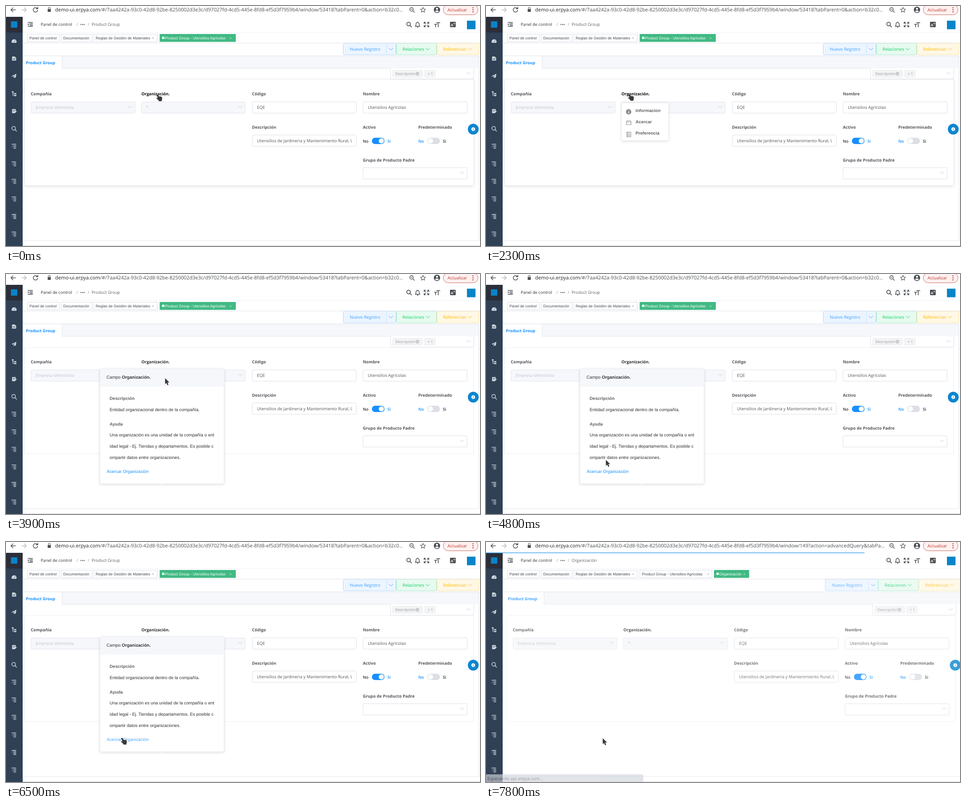
Animation, 1052 px wide and 532 px high, one loop 8 s. Source, as an HTML page:

```html
<!DOCTYPE html>
<html lang="es">
<head>
<meta charset="utf-8">
<title>Product Group</title>
<style>
html, body { margin: 0; width: 100%; height: 100%; overflow: hidden; background: #fff; }
svg { display: block; width: 1052px; height: 532px; }
text { font: 9.2px "Open Sans", "Noto Sans", sans-serif; fill: #303133; white-space: pre; text-rendering: geometricPrecision; }
.url { font-size: 11px; fill: #4c5055; }
.label { font-weight: 700; fill: #54575c; }
.value { font-size: 9.4px; fill: #505358; }
.button { font-size: 9.6px; }
.chip { font-size: 8.1px; fill: #909399; }
.state { font-size: 9px; font-weight: 600; }
.tab { font: 8.36px "Liberation Sans", Arial, sans-serif; fill: #414754; }
.body { font: 9.7px "Liberation Sans", Arial, sans-serif; }
.strong { font-weight: 700; fill: #606266; }
</style>
</head>
<body>
<svg id="stage" viewBox="0 0 1052 532" xmlns="http://www.w3.org/2000/svg"></svg>
<script>
const BLUE = '#1890ff', BRAND = '#0a84c8', GREEN = '#42b983';
const GROUP = 'Utensilios Agrícolas';

const text = (x, y, s, cls = '', more = '') => `<text x="${x}" y="${y}" class="${cls}" ${more}>${s}</text>`;
const rect = (x, y, w, h, fill, stroke = 'none', r = 0, more = '') =>
  `<rect x="${x}" y="${y}" width="${w}" height="${h}" rx="${r}" fill="${fill}" stroke="${stroke}" ${more}/>`;
const circle = (x, y, r, fill, stroke = 'none', more = '') =>
  `<circle cx="${x}" cy="${y}" r="${r}" fill="${fill}" stroke="${stroke}" ${more}/>`;
const line = (d, stroke, w = 1) =>
  `<path d="${d}" fill="none" stroke="${stroke}" stroke-width="${w}" stroke-linecap="round" stroke-linejoin="round"/>`;
const shape = (d, fill, more = '') => `<path d="${d}" fill="${fill}" ${more}/>`;
const at = (x, y, s) => `<g transform="translate(${x} ${y})">${s}</g>`;
const group = (id, s, more = '') => `<g id="${id}" ${more}>${s}</g>`;
const chevron = (x, y, color = '#c0c4cc') => line(`M${x - 4} ${y - 2}l4 4 4-4`, color);
const lens = (x, y, color, w) => circle(x - 1, y - 1, 4, 'none', color, `stroke-width="${w}"`) + line(`M${x + 2} ${y + 2}l3.5 3.5`, color, w);

function browserBar() {
  const ink = '#4a4d51';
  return rect(0, 0, 1052, 24, '#fff') +
    line('M21 8.5H11M15.5 4L11 8.5l4.5 4.5', ink, 1.5) +
    line('M35 8.5H45M40.5 4L45 8.5l-4.5 4.5', '#babcbe', 1.5) +
    line('M69.5 5.5a5 5 0 1 0 .8 4M70.5 2.5v3.7h-3.7', ink, 1.5) +
    rect(92.5, 7, 7, 6, ink, 'none', 1) + line('M94 7V5a2 2 0 0 1 4 0v2', ink, 1.2) +
    text(109, 12.3, '', 'url', 'id="url"') +
    lens(901, 8.5, ink, 1.3) + line('M898 7.5h4', ink) +
    line('M925.5 3l1.6 3.7 4 .4-3 2.7.9 4-3.5-2.1-3.5 2.1.9-4-3-2.7 4-.4z', ink, 1.1) +
    circle(956.5, 8.5, 7, ink) + circle(956.5, 6.3, 2.3, '#fff') + shape('M952 12q4.5-4.5 9 0-4.5 4-9 0', '#fff') +
    rect(970.5, -2.5, 77, 22, '#fdf1f0', '#cf6a64', 11) +
    text(980, 12, 'Actualizar', '', 'style="fill:#b93a33;font-size:9.5px"') +
    [4, 8.5, 13].map(y => circle(1036.5, y, 1.2, '#c5221f')).join('');
}

function sidebar() {
  const c = '#d3dae3';
  const rows = [
    shape('M-5 4a5.5 5.5 0 1 1 10 0z', c) + line('M0 2l2-3', '#304156'),
    shape('M-4.5-4.5h6l3 3v6h-9z', c) + line('M-2.5 0h5M-2.5 2h5', '#304156', .8),
    shape('M5-5L-5.5 0l3 1.5L3-3-1 2.5V5l2-2 2.5 1z', c),
    rect(-5, -5, 4, 2.5, c) + rect(0, -1, 5, 2.5, c) + rect(0, 3, 5, 2.5, c) + line('M-3-2v6h3M-3 0h3', c),
    shape('M-4.5-4.5h8v5l-3 4h-5z', c) + line('M-2.5-2h4M-2.5 0h3', '#304156', .8) + line('M1 4l4-4', c, 1.5),
    lens(0, 0, c, 1.5)
  ];
  const list = line('M-5-4.5h9M-1-1.5h5M-1 1.5h5M-1 4.5h5', c, 1.3) + line('M-4-1.5h.5M-4 1.5h.5', c, 1);
  let s = rect(0, 24, 37, 508, '#304156') + rect(0, 24, 37, 35, '#2b2f3a') + rect(11, 34, 14, 14, BRAND);
  for (let i = 0; i < 12; i++) s += at(18, 77.5 + i * 38.9, rows[i] || list);
  return s;
}

function header() {
  const c = '#45494f';
  const tab = (x, w, label, close) => rect(x + .5, 62.5, w, 16.5, '#fff', '#d8dce5') +
    text(x + 5, 74, label, 'tab') + (close ? text(close, 73.5, '×', 'tab', 'style="fill:#999"') : '');
  const active = (x, w, label, pad, close) => rect(x, 62, w, 17.5, GREEN) + circle(x + 8, 70.5, 2.8, '#fff') +
    text(x + pad, 74, label, 'tab', 'style="fill:#fff"') + text(close, 73.5, '×', 'tab', 'style="fill:#cfeee0"');
  const long = 'Product Group - ' + GROUP;
  return rect(37, 24, 1015, 58, '#fff') + line('M37 58.5H1052', '#f0f1f3') + line('M37 82H1052', '#dfe2e9') +
    line('M49 36.5h10M53 39.5h6M53 42.5h6M49 45h10', c, 1.4) + shape('M48.5 38.5l3 2.3-3 2.3z', c) +
    text(77, 44, 'Panel de control') + text(156.5, 44, '/', '', 'style="fill:#909399"') +
    [166.5, 170, 173.5].map(x => circle(x, 41, 1.2, '#606266')).join('') +
    text(181.5, 44, '/', '', 'style="fill:#909399"') + text(190, 44, '', '', 'id="crumb" style="fill:#5c6066"') +
    lens(894.5, 41, c, 1.7) +
    line('M908.5 45h10c-1.5-1.5-1.5-2.5-1.5-5a3.5 3.5 0 0 0-7 0c0 2.5 0 3.5-1.5 5M913.5 35.5v1M912.5 47h2', c, 1.4) +
    line('M928 39v-3h3M935.5 36h3v3M938.5 43v3h-3M931 46h-3v-3M928.5 36.5l3 3M938 36.5l-3 3M938 45.5l-3-3M928.5 45.5l3-3', c, 1.4) +
    line('M955.5 37h7.5M959.3 37v9.5M951 40.5h5M953.5 40.5v6', c, 1.6) +
    rect(985.5, 35, 12.5, 12, c, 'none', 1) + text(987, 45, 'A', 'tab', 'style="fill:#fff;font-weight:700;font-size:8px"') + line('M993 38.5h3.5M994.7 37.5v1M996 39l-2.5 3', '#fff', .8) +
    rect(1023, 32.5, 19, 19, BRAND) +
    tab(47, 71, 'Panel de control') + tab(122, 69, 'Documentación') + tab(194, 141, 'Reglas de Gestión de Materiales', 324) +
    group('tabsBefore', active(341, 169, long, 12, 496)) +
    group('tabsAfter', tab(341, 160, long, 491) + active(506, 78, 'Organización', 12, 571));
}

function input(x, y, value, off) {
  return rect(x + .5, y + .5, 231, 25, off ? '#f5f7fa' : '#fff', off ? '#e4e7ed' : '#dcdfe6', 2.5) +
    text(x + 11, y + 16.3, value, 'value', off ? 'style="fill:#c0c4cc"' : 'clip-path="url(#crop)"');
}

function toggle(x, on) {
  const hot = `style="fill:${BLUE}"`;
  return text(x, 302.7, 'No', 'state', on ? '' : hot) + rect(x + 20, 292, 28, 14, on ? BLUE : '#dcdfe6', 'none', 7) +
    circle(on ? x + 41 : x + 27, 299, 5.7, '#fff') + text(x + 54.5, 302.7, 'Si', 'state', on ? hot : '');
}

function page() {
  const button = (x, w, label, tx, ink, fill, edge, cx) => rect(x + .5, 82.5, w, 25.5, fill, edge, 2) +
    text(tx, 99, label, 'button', `style="fill:${ink}"`) + chevron(cx, 95.5, ink);
  const card = 'x="41" y="163" width="997" height="235" rx="3"';
  return button(748, 117, 'Nuevo Registro', 763, '#409eff', '#ecf5ff', '#b3d8ff', 854.5) + line('M844.5 83v24.5', '#c6e2ff') +
    button(866, 89, 'Relaciones', 880, '#13ce66', '#e7faf0', '#a1ebc2', 936) +
    button(956, 93, 'Referencias', 970, '#ffba00', '#fff8e6', '#ffe399', 1030) +
    rect(853.5, 132.5, 185, 29.5, '#fff', '#dcdfe6', 2.5) +
    rect(37, 111, 1013, 27, '#f5f7fa') + rect(37, 111, 87, 28, '#fff') +
    line('M37 110.5H1049.5V520H37M124.5 111v27H853', '#dfe4ed') + line('M37 531.5H1052', '#dcdcdc', 1.5) +
    text(44, 129, 'Product Group', '', `style="fill:${BLUE};font-weight:700;font-size:9px"`) +
    rect(858.5, 142.5, 66, 15, '#f4f4f5', '#e9e9eb', 2) + text(864, 153, 'Descripción', 'chip') +
    circle(913, 150, 4, '#c0c4cc') + line('M911.7 148.7l2.6 2.6m0-2.6l-2.6 2.6', '#fff', .8) +
    rect(929.5, 142.5, 23, 15, '#f4f4f5', '#e9e9eb', 2) + text(936, 153, '+ 1', 'chip') + chevron(1026.5, 149.5) +
    `<rect id="shadow" ${card} fill="#fff" filter="url(#soft)"/><rect ${card} fill="#fff" stroke="#ebeef5"/>` +
    text(55, 198, 'Compañía', 'label') + text(300.5, 198, 'Organización.', 'label', 'id="field"') +
    text(546, 198, 'Código', 'label') + text(792, 198, 'Nombre', 'label') +
    input(55, 212, 'Empresa Velmontia', true) + chevron(274, 223.5) +
    input(300, 212, '*', true) + chevron(520, 223.5) +
    input(546, 212, 'EQE') + input(792, 212, GROUP) +
    text(546, 271.5, 'Descripción', 'label') + text(792, 271.5, 'Activo', 'label') + text(915, 271.5, 'Predeterminado', 'label') +
    input(546, 285.5, 'Utensilios de Jardineria y Mantenimiento Rural, Utiles') +
    toggle(792, true) + toggle(915, false) +
    text(792, 344.5, 'Grupo de Producto Padre', 'label') + input(792, 358, '') + chevron(1012, 369.5) +
    circle(1037, 273, 12, '#0a86d0') + circle(1037, 273, 4.2, '#fff') +
    line('M1037.2 272.6l-.5 2.5M1037.5 270.7v.1', '#0a86d0', 1.2);
}

function menu() {
  const c = '#8c8e92';
  return rect(301, 215, 104, 83, '#fff', 'none', 2, 'filter="url(#soft)"') + rect(301, 215, 104, 83, '#fff', '#f0f1f4', 2) +
    circle(316.5, 234.5, 6, c) + line('M316.8 234l-.7 3.5M317.2 231.3v.1', '#fff', 1.3) +
    line('M311.5 257h10.5v6h-10.5zM313 254.5h7.5l1.5 2.5M313 254.5l-1.5 2.5', c, 1.1) +
    line('M312.5 279.5h9v10.5h-9zM314.5 279.5v10.5M316.5 282h3M316.5 284.7h3M316.5 287.4h3', c, 1.1) +
    ['Informacion', 'Acercar', 'Preferencia'].map((s, i) => text(332, 235.3 + i * 24.7, s, 'body strong')).join('');
}

function popover() {
  const lines = ['Una organización es una unidad de la compañía o ent', 'idad legal - Ej. Tiendas y departamentos. Es posible c', 'ompartir datos entre organizaciones.'];
  return rect(208.5, 210, 275.5, 255, '#fff', 'none', 3, 'filter="url(#soft)"') +
    shape('M341 464h10l-5 4.5z', '#fff', 'stroke="#ebeef5"') + rect(208.5, 210, 275.5, 255, '#fff', '#e6e9f0', 3) +
    rect(209, 210.5, 274.5, 39, '#f5f7fa') +
    text(223, 232.3, 'Campo <tspan font-weight="700">Organización.</tspan>', 'body') +
    text(230, 279.3, 'Descripción', 'body strong') + text(230, 304, 'Entidad organizacional dentro de la compañía.', 'body') +
    text(230, 335.5, 'Ayuda', 'body strong') + lines.map((s, i) => text(230, 360.3 + i * 24.7, s, 'body')).join('') +
    text(223.5, 441.3, 'Acercar Organización', 'body', 'id="link"');
}

const HAND = 'M2.2 0C.8.2.6 1.5 1 2.5L3.6 8 1.3 7.4C0 7.3-.1 8.6.8 9.2L5 13l.5 2H12l.6-3c1-3 .4-5.5-.6-6.6-1-.8-4-1-6-.8L4 1C3.6.2 3 0 2.2 0z';
const ARROW = 'M0 0v13l3-2.5 2.2 5 2.4-1-2-4.9 3.9-.4z';

const stage = document.getElementById('stage');
stage.innerHTML = `<defs>
  <filter id="soft" x="-20%" y="-20%" width="140%" height="150%"><feDropShadow dx="0" dy="1.5" stdDeviation="3" flood-color="#000" flood-opacity=".14"/></filter>
  <clipPath id="crop"><path d="M546 200H768V400H546zM792 200H1016V400H792z"/></clipPath></defs>` +
  rect(0, 0, 1052, 532, '#fff') + group('page', page()) + header() + sidebar() + browserBar() +
  group('menu', menu()) + group('popover', popover()) +
  group('loading', rect(0, 23.2, 840, 1.5, '#4aa8ee')) +
  group('status', shape('M0 515H346a3 3 0 0 1 3 3V532H0z', '#d2d6dc') + text(3, 527.5, 'Esperando api.erpya.com...', '', 'style="fill:#60656a;font-size:9.8px"'), 'opacity=".65"') +
  `<path id="cursor" fill="#3a3a3a" stroke="#fff" stroke-width=".7" stroke-opacity=".8" paint-order="stroke"/>`;

const el = {};
for (const node of stage.querySelectorAll('[id]')) el[node.id] = node;

// Pointer stops: time, x, y, hand
const stops = [
  [0, 333.5, 196, 1], [900, 326, 180, 1], [1000, 312, 162, 0], [1100, 303, 153, 0], [1200, 302, 167, 0],
  [1300, 306, 186, 1], [1400, 311, 192, 1], [1500, 315, 195, 1], [2500, 323, 205, 1], [2600, 338, 222, 1],
  [2700, 349.5, 231, 1], [3900, 353, 231, 0], [4100, 338, 232, 0], [4300, 312, 275, 0], [4400, 275, 338, 0],
  [4700, 270, 378, 0], [4800, 266, 412, 0], [5200, 264, 425, 0], [5400, 263, 327, 0], [5700, 262, 312, 0],
  [5800, 260, 297, 0], [6100, 254, 433, 1], [6300, 253, 435, 1], [6500, 255, 434, 1], [7800, 259, 435, 0]
];
const clamp = v => Math.max(0, Math.min(1, v));
const show = (node, on) => node.setAttribute('display', on ? 'inline' : 'none');
const write = (node, s) => { if (node.innerHTML !== s) node.innerHTML = s; };

const base = '<tspan fill="#202124">demo-ui.erpya.com</tspan>/#/7aa4242a-93c0-42d8-92be-8250002d3e3c/d97027fd-4cd5-445e-8fd8-ef5d3f7959b4/window/';
const urls = [base + '53418?tabParent=0&amp;action=b32c0...', base + '149?action=advancedQuery&amp;tabPa...'];

function draw(time) {
  const t = Math.floor(time / 100) * 100;

  const [, x, y, hand] = stops.filter(s => s[0] <= t).pop();
  el.cursor.setAttribute('d', hand ? HAND : ARROW);
  el.cursor.setAttribute('transform', `translate(${x} ${y})`);

  const lift = t < 1400 ? 1 - clamp((t - 900) / 300) : t < 2500 ? clamp((t - 1300) / 200) : 1 - clamp((t - 2400) / 300);
  el.shadow.setAttribute('opacity', lift);
  el.field.style.fill = t < 3400 ? '#111' : '#303133';

  const open = t < 3400 ? 1 - (1 - clamp((t - 1800) / 500)) ** 3 : .55;
  show(el.menu, t >= 1900 && t < 3700);
  el.menu.setAttribute('opacity', open);
  el.menu.setAttribute('transform', `translate(0 ${215 * (1 - open)}) scale(1 ${open})`);

  show(el.popover, t >= 3700 && t < 7800);
  el.link.style.fill = t < 6100 || t >= 7200 ? BLUE : t < 6300 ? '#309bff' : '#46a6ff';

  const left = t >= 7800;
  write(el.url, urls[+(t >= 7500)]);
  write(el.crumb, left ? 'Organización' : 'Product Group');
  show(el.status, t >= 7500);
  show(el.loading, left);
  show(el.tabsBefore, !left);
  show(el.tabsAfter, left);
  el.page.setAttribute('transform', `translate(${left ? 4.5 : 0} 0)`);
  el.page.setAttribute('opacity', left ? .8 : 1);
}

function tick() {
  draw(performance.now() % 8000);
  requestAnimationFrame(tick);
}
tick();
</script>
</body>
</html>
```
